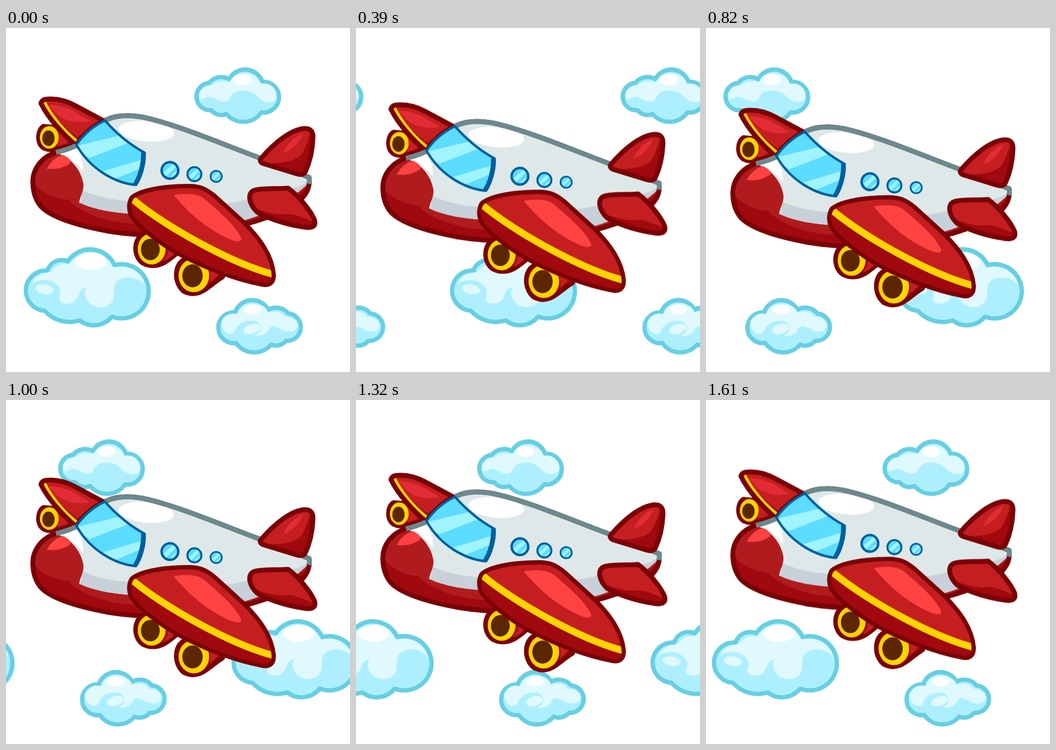
Write an HTML page that moves like this. It is 640 px wide and 640 px high and loops after 1.65 s.

```html
<!DOCTYPE html>
<html lang="en">
<head>
<meta charset="utf-8">
<title>Airplane</title>
<style>
  html, body { margin: 0; width: 100%; height: 100%; overflow: hidden; background: #fff; }
  svg { display: block; width: 100vw; height: 100vh; }
  #sky { animation: drift 1650ms infinite; }
  #plane { animation: bob 1650ms infinite; }

  @keyframes drift {
    0%      { transform: translateX(0);     animation-timing-function: steps(6); }
    12.727% { transform: translateX(77.3px);  animation-timing-function: steps(11); }
    34.545% { transform: translateX(219px); animation-timing-function: steps(8); }
    49.697% { transform: translateX(322px); animation-timing-function: steps(9); }
    69.091% { transform: translateX(438px); animation-timing-function: steps(6); }
    80%     { transform: translateX(515px); animation-timing-function: steps(8); }
    97.576% { transform: translateX(618px); animation-timing-function: steps(1); }
    100%    { transform: translateX(640px); }
  }
  @keyframes bob {
    0%      { transform: translateY(0);      animation-timing-function: steps(6); }
    12.727% { transform: translateY(6px);    animation-timing-function: steps(11); }
    34.545% { transform: translateY(16.5px); animation-timing-function: steps(6); }
    45.909% { transform: translateY(22px);   animation-timing-function: steps(2); }
    49.697% { transform: translateY(21px);   animation-timing-function: steps(9); }
    69.091% { transform: translateY(13.7px); animation-timing-function: steps(6); }
    80%     { transform: translateY(8px);    animation-timing-function: steps(8); }
    97.576% { transform: translateY(1.7px);  animation-timing-function: steps(1); }
    100%    { transform: translateY(0); }
  }

  .puff { fill: #aeefff; stroke: #67cfe3; stroke-width: 8; stroke-linejoin: round; }
  .mist { fill: #dff9ff; }
  .white { fill: #fff; }
  .edge { stroke: #7a0206; stroke-width: 9; stroke-linejoin: round; }
  .wide { stroke-width: 16; paint-order: stroke; }
  .line { fill: none; }
  .red { fill: #c41e20; }
  .dark { fill: #a0090d; }
  .glow { fill: #ff4242; }
  .soft { fill: #e22c35; }
  .gold { fill: #ffd400; }
  .hole { fill: #5c2600; }
  .shade { fill: #c8d0d9; }
  .glass { fill: #5cdcff; }
  .frame { stroke: #005f9e; stroke-width: 4.5; stroke-linejoin: round; }
  .shine { fill: #a0f4ff; }
  .rim { fill: none; stroke: #6a8a8e; stroke-width: 9; }
</style>
</head>
<body>
<svg viewBox="0 0 640 640">
  <defs>
    <path id="small" class="puff" d="M378 102A29 29 0 0 1 415 95A34 34 0 0 1 477 100A28.7 28.7 0 1 1 475 157A41 41 0 0 1 410 160A24 24 0 0 1 382 153A25.2 25.2 0 1 1 378 102Z"/>
    <path id="hull" d="M50 290C48 262 68 238 95 231Q115 226 130 219C145 196 165 180 186 171C205 162 228 161 255 166C320 180 400 215 470 241L564 278C567 300 555 318 530 333C490 354 440 369 380 378C320 387 250 388 190 378C130 367 85 353 65 332Q51 315 50 290Z"/>
    <path id="wing" d="M237 318C255 304 300 298 340 298C360 298 370 303 385 315L440 365C470 395 491 425 494 458C495 472 488 476 476 473C430 465 370 442 320 415C280 392 245 362 236 347Q230 331 237 318Z"/>
    <path id="fin" d="M475 242C500 213 530 189 555 187C567 186 572 193 571 206C570 230 564 252 557 267Q553 275 540 271L478 252Q470 248 475 242Z"/>
    <path id="tail" d="M462 302C480 297 505 300 525 298C545 313 567 340 574 357C577 368 571 372 560 371C530 368 490 356 468 343C453 330 447 307 462 302Z"/>
    <path id="farWing" d="M65 140Q67 132 80 132C100 131 115 137 128 144L186 175L131 219C106 198 78 167 65 140Z"/>
    <path id="pane" d="M131 217C146 196 165 181 184 172C207 198 230 217 258 232C259 252 252 277 242 292C205 289 157 264 131 217Z"/>
    <clipPath id="inHull"><use href="#hull"/></clipPath>
    <clipPath id="inWing"><use href="#wing"/></clipPath>
    <clipPath id="inFin"><use href="#fin"/></clipPath>
    <clipPath id="inTail"><use href="#tail"/></clipPath>
    <clipPath id="inFar"><use href="#farWing"/></clipPath>
    <clipPath id="inPane"><use href="#pane"/></clipPath>

    <g id="port">
      <circle class="glass frame" r="15.5"/>
      <path class="shine" d="M-12 4L6 -12L11 -7L-7 11ZM0 12L12 1L11 6L5 12Z"/>
    </g>

    <g id="clouds">
      <use href="#small"/>
      <path class="mist" d="M360 120C368 106 380 109 386 104C395 97 408 100 417 100C425 79 465 78 474 104C492 100 506 115 503 130C500 140 480 140 470 130C460 115 435 113 425 120C415 126 418 135 408 137C395 138 388 128 378 128C370 128 362 138 360 130Z"/>
      <ellipse class="white" cx="440" cy="96" rx="17" ry="10"/>

      <use href="#small" transform="translate(903 429) scale(-1 1)"/>
      <path class="mist" d="M400 548C405 534 420 528 430 533Q436 514 457 513C475 512 486 520 488 530C500 525 515 528 518 537C530 537 543 543 543 554C540 568 518 566 512 560C500 554 494 553 489 560C485 572 470 574 462 572C477 568 478 548 462 545C440 542 428 555 425 566C415 574 402 566 400 548Z"/>
      <ellipse class="mist" cx="457" cy="560" rx="16" ry="9" transform="rotate(-17 457 560)"/>
      <ellipse class="white" cx="458" cy="524" rx="16" ry="9"/>

      <path class="puff" d="M77 451A28 28 0 0 1 115 434A50 50 0 0 1 202 441A50.5 50.5 0 1 1 197 537A43 43 0 0 1 137 544A62 62 0 0 1 72 526A37.3 37.3 0 0 1 77 451Z"/>
      <path class="mist" d="M48 476C58 455 75 456 84 454C95 437 108 440 118 439C140 409 185 411 199 446C225 440 250 450 260 480C245 460 215 459 204 475C198 490 205 500 195 512C180 525 160 519 152 508C146 500 145 490 150 483C135 483 137 500 128 508C115 518 95 512 100 500C105 485 95 474 80 470C65 467 52 472 48 476Z"/>
      <ellipse class="white" cx="158" cy="434" rx="29" ry="16"/>
      <ellipse class="mist" cx="72" cy="486" rx="17" ry="9" transform="rotate(10 72 486)"/>
    </g>
  </defs>

  <g id="sky">
    <use href="#clouds"/>
    <use href="#clouds" x="-640"/>
  </g>

  <g id="plane">
    <!-- far wing and engine -->
    <path class="dark edge" d="M70 183C58 190 57 214 70 223C85 231 105 222 130 217L92 185Z"/>
    <path class="red" d="M88 184L118 210Q108 218 96 219Z"/>
    <use href="#farWing" class="red"/>
    <g clip-path="url(#inFar)">
      <path class="dark" d="M90 168Q130 183 186 178L131 222Z"/>
      <path class="red" d="M72 140Q98 178 133 203L165 178L90 138Z"/>
      <path class="soft" d="M80 143C98 143 118 150 128 156L156 173C140 178 115 173 104 167Q90 158 80 143Z"/>
      <path d="M69 134Q90 178 135 214" fill="none" stroke="#ffd400" stroke-width="7"/>
    </g>
    <use href="#farWing" class="line edge"/>
    <ellipse class="gold" cx="80.5" cy="203.5" rx="17.5" ry="21"/>
    <ellipse class="hole" cx="79" cy="205" rx="11.5" ry="14.5"/>

    <!-- fuselage -->
    <use href="#hull" fill="#dfe8e8"/>
    <g clip-path="url(#inHull)">
      <path class="shade" d="M142 302C175 316 205 321 240 322L410 326Q450 323 500 300L566 280V400H130Z"/>
      <path fill="#dfe8e8" d="M480 250L566 281Q550 296 530 298Z"/>
      <path class="white" d="M96 233L131 222C139 235 144 248 143 266Q126 243 96 233Z"/>
      <path fill="#b01c1e" d="M40 225L95 233C120 240 140 264 144 290C145 305 138 312 136 325C165 339 205 345 240 346L430 361C480 350 525 325 567 285V400H40Z"/>
      <path class="dark" d="M48 283C68 312 105 323 136 319V329C165 350 205 357 245 362L430 365Q500 350 567 290V400H40Z"/>
      <path fill="#b01c1e" d="M136 319V325C165 339 205 345 240 346V364C190 362 145 347 116 321Z"/>
      <path class="glow" d="M76 262C82 248 95 239 106 236C117 241 122 247 119 252C105 262 90 263 76 262Z"/>
      <ellipse class="white" cx="261" cy="192" rx="52" ry="19" transform="rotate(5 261 192)"/>
    </g>
    <use href="#hull" class="line edge"/>
    <path class="rim" d="M93 231.500Q115 226 130 219M184 172C205 162 228 161 255 166C320 180 400 215 470 241L564 278Q565 283 564 290"/>

    <!-- windows -->
    <use href="#pane" class="glass"/>
    <g clip-path="url(#inPane)">
      <path class="shine" d="M125 221L212 200L232 212L155 242ZM172 269L262 242V256L200 282Z"/>
      <path d="M256 231Q256 266 240 292" fill="none" stroke="#005f9e" stroke-width="9"/>
    </g>
    <use href="#pane" class="line frame"/>
    <use href="#port" transform="translate(305 265)"/>
    <use href="#port" transform="translate(350.5 272) scale(.84)"/>
    <use href="#port" transform="translate(391 276) scale(.68)"/>

    <!-- tail -->
    <use href="#fin" class="red"/>
    <g clip-path="url(#inFin)">
      <path class="dark" d="M470 250C505 254 535 250 549 236Q561 218 567 188L580 190V280H470Z"/>
      <path class="soft" d="M553 195C536 203 522 216 516 233C534 225 547 213 553 195Z"/>
    </g>
    <use href="#fin" class="line edge"/>
    <use href="#tail" class="red"/>
    <path class="dark" clip-path="url(#inTail)" d="M455 331C480 343 505 349 530 346Q555 352 578 364V380H450Z"/>
    <use href="#tail" class="line edge"/>

    <!-- near engines -->
    <path class="dark edge" d="M254 384C237 395 237 424 254 437C282 452 305 431 326 412V390L275 375Z"/>
    <path class="red" d="M285 385Q306 397 300 422L292 434Q308 428 318 414L322 398Z"/>
    <ellipse class="gold" cx="271" cy="411" rx="26" ry="29"/>
    <ellipse class="hole" cx="268.5" cy="412" rx="17.5" ry="20"/>
    <path class="dark edge" d="M334 430C313 437 311 474 331 490C362 505 378 477 403 463V445L355 420Z"/>
    <path class="red" d="M362 432Q384 444 380 473Q394 462 400 450Z"/>
    <ellipse class="gold" cx="349.5" cy="460.5" rx="28.5" ry="31"/>
    <ellipse class="hole" cx="347" cy="461" rx="19" ry="21.5"/>

    <!-- near wing -->
    <use href="#wing" class="red edge wide"/>
    <g clip-path="url(#inWing)">
      <path class="dark" d="M228 318C290 372 420 445 500 464V490H228Z"/>
      <path d="M230 314C290 366 420 439 500 459" fill="none" stroke="#ffd400" stroke-width="13"/>
      <path class="glow" d="M312 311C330 307 355 307 368 317C395 340 428 368 438 392C437 400 424 397 410 390C375 373 345 350 312 311Z"/>
    </g>
  </g>
</svg>
</body>
</html>
```
